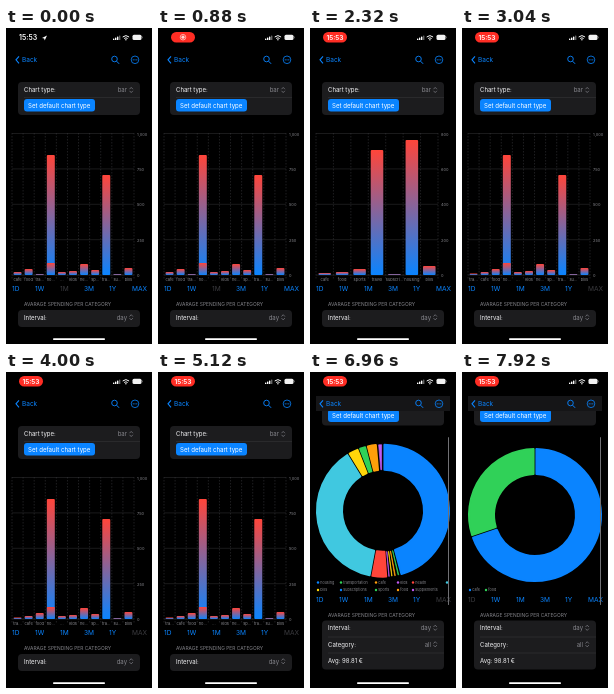
Animation, 146 px wide and 316 px high, one loop 8000 ms. Source, as an HTML page:

```html
<!DOCTYPE html>
<html>
<head>
<meta charset="utf-8">
<style>
html, body { margin: 0; width: 100%; height: 100%; overflow: hidden; background: #000; }
svg { display: block; width: 146px; height: 316px; font-family: Inter, Roboto, sans-serif; }
</style>
</head>
<body>
<svg id="stage" viewBox="0 0 146 316"></svg>
<script>
const stage = document.getElementById('stage');
const BLUE = '#0a84ff', GREEN = '#30d158', RED = '#ff453a', CYAN = '#40c8e0',
      YELLOW = '#ffd60a', ORANGE = '#ff9f0a', PURPLE = '#bf5af2',
      GRAY = '#85858b', CARD = '#1c1c1e';
const LOOP = 8000, STEP = 80;

const ease = (t, a, b) => {
  const x = Math.min(1, Math.max(0, (t - a) / (b - a)));
  return x * x * (3 - 2 * x);
};
const text = (x, y, s, size = 6, fill = '#f2f2f4', extra = '') =>
  `<text x="${x}" y="${y}" font-size="${size}" fill="${fill}" ${extra}>${s}</text>`;
const rect = (x, y, w, h, fill, r = 0, extra = '') =>
  `<rect x="${x}" y="${y}" width="${w}" height="${h}" rx="${r}" fill="${fill}" ${extra}/>`;
const line = (d, stroke, w = .5, extra = '') =>
  `<path d="${d}" fill="none" stroke="${stroke}" stroke-width="${w}" ${extra}/>`;
const dot = (x, y, r, fill) => `<circle cx="${x}" cy="${y}" r="${r}" fill="${fill}"/>`;
const END = 'text-anchor="end"', MID = 'text-anchor="middle"';

const picker = (y, s) => text(121, y, s, 6, GRAY, END) +
  line(`M123.5 ${y - 3} l1.7 -1.8 l1.7 1.8 M123.5 ${y - 1.4} l1.7 1.8 l1.7 -1.8`, GRAY, .7);

// Bar charts: axis maximum, bar heights in pixels, labels
const MONTH = { max: 1000, bars: [3, 6, 1, 120, 3, 4, 11, 5, 100, 1, 7],
  names: ['cafe', 'food', 'tra...', 'ho...', '...', 'kids', 'he...', 'sp...', 'tra...', 'su...', 'bills'] };
const WEEK = { max: 800, bars: [2, 3, 6, 125, 1, 135, 9],
  names: ['cafe', 'food', 'sports', 'travel', 'subscri...', 'housing', 'bills'] };
const MAX = { max: 1000, bars: [1.5, 3, 6, 120, 3, 4, 11, 5, 100, 1, 7],
  names: ['tra...', 'cafe', 'food', 'ho...', '...', 'kids', 'he...', 'sp...', 'tra...', 'su...', 'bills'] };

function barChart({ max, bars, names }) {
  const step = 122 / bars.length, w = step * .72;
  let s = '';
  for (let i = 0; i < 5; i++) {
    const y = 105.5 + i * 35.4;
    s += line(`M6 ${y}H128`, '#343437') +
      text(131, y + 2, (max * (4 - i) / 4).toLocaleString('en-US'), 4, GRAY);
  }
  bars.forEach((h, i) => {
    const x = 6 + step * i, mid = x + step / 2, y = 247 - h;
    s += line(`M${x} 105V252`, '#3d3d41', .5, 'stroke-dasharray="1.5 1.5"');
    s += rect(mid - w / 2, y, w, h, 'url(#heat)', Math.min(1, h / 2));
    if (h === 120) s += rect(mid - w / 2, 235, w, 12, 'url(#heat)', .8);
    s += text(mid, 253, names[i], 4, GRAY, MID);
  });
  return s + line('M128 105V252', '#3d3d41', .5, 'stroke-dasharray="1.5 1.5"');
}

// Donut slices: colour and end angle in degrees, clockwise from the top
const MANY = [[BLUE, 165], [GREEN, 168], [ORANGE, 171], [YELLOW, 173.5], [PURPLE, 176],
  [RED, 190.5], [CYAN, 328.5], [YELLOW, 338.5], [GREEN, 345.5], [ORANGE, 355], [PURPLE, 360]];
const TWO = [[BLUE, 251], [GREEN, 360]];

function donut(slices, cy) {
  let from = 0, s = '';
  for (const [color, to] of slices) {
    const span = (to - from) * Math.PI / 180, a = from * Math.PI / 180;
    const at = (r, end) => {
      const inset = Math.min(1.4 / r, span * .45);
      const q = end ? a + span - inset : a + inset;
      return `${(73 + r * Math.sin(q)).toFixed(2)} ${(cy - r * Math.cos(q)).toFixed(2)}`;
    };
    const big = to - from > 180 ? 1 : 0;
    const width = span < .1 ? .7 : 2;
    s += `<path d="M${at(66, 0)}A66 66 0 ${big} 1 ${at(66, 1)}L${at(41, 1)}A41 41 0 ${big} 0 ${at(41, 0)}Z"
      fill="${color}" stroke="${color}" stroke-width="${width}" stroke-linejoin="round"/>`;
    from = to;
  }
  return s;
}

const legend = items => items.map(([x, y, c, s]) =>
  dot(x, y, 1.2, c) + text(x + 2.3, y + 1.3, s, 3.7, GRAY)).join('');
const MANY_KEYS = [
  [8, 244, BLUE, 'housing'], [31, 244, GREEN, 'transportation'], [66, 244, ORANGE, 'cafe'],
  [88, 244, PURPLE, 'kids'], [103, 244, RED, 'health'], [137, 244, CYAN, ''],
  [8, 251.5, YELLOW, 'bills'], [31, 251.5, BLUE, 'subscriptions'], [66, 251.5, GREEN, 'sports'],
  [88, 251.5, ORANGE, 'food'], [103, 251.5, PURPLE, 'supplements']];
const TWO_KEYS = [[8, 251.5, BLUE, 'cafe'], [24, 251.5, GREEN, 'food']];

const ranges = active => ['1D', '1W', '1M', '3M', '1Y', 'MAX'].map((s, i) =>
  text([6, 29, 54, 78, 103, 126][i], 263, s, 6.6, s === active ? '#3c3c40' : BLUE)).join('');

function settings(pie) {
  let s = text(18, 278, 'AVARAGE SPENDING PER CATEGORY', 4.9, GRAY) +
    rect(12, 282, 122, pie ? 49 : 17, CARD, 4) + text(18, 291.5, 'Interval:') + picker(291.5, 'day');
  if (pie) s += line('M18 298.5H134M18 314.5H134', '#38383b') +
    text(18, 308, 'Category:') + picker(308, 'all') + text(18, 324.5, 'Avg: 98.81 €');
  return s;
}

const topCard = () => rect(12, 54, 122, 33, CARD, 4) + text(18, 64.2, 'Chart type:') +
  picker(64.2, 'bar') + line('M18 69.5H134', '#38383b') +
  rect(18, 71, 71, 12.5, BLUE, 3) + text(22, 79.6, 'Set default chart type', 6.1, '#fff');

function menu(open) {
  if (open <= 0) return '';
  return `<g opacity="${open}" transform="translate(122 69) scale(${.3 + .7 * open}) translate(-122 -69)">` +
    rect(34, 69, 94, 33.5, '#242427', 5) + rect(34, 69, 94, 33.5, 'url(#glow)', 5) +
    line('M34 86H128', '#3a3a3e') + line('M38.5 78l1.5 2l3 -4.2', '#fff', .9) +
    text(47, 80.2, 'bar') + text(47, 96.5, 'pie') + '</g>';
}

function status(t) {
  let s = '';
  if (t < 400) {
    s += text(13, 12.3, '15:53', 7, '#fff', 'font-weight="600"') +
      '<path d="M36 10l5 -2.4l-2.3 5l-.5 -2.2z" fill="#fff"/>';
  } else {
    s += rect(13, 4, 24, 10.5, '#ff2d24', 5.2);
    s += t < 1500
      ? `<circle cx="25" cy="9.2" r="2.8" fill="none" stroke="#ffd8d5" stroke-width=".7"/>` + dot(25, 9.2, 1.6, '#ffd8d5')
      : text(25, 11.7, '15:53', 6.6, '#fff', MID + ' font-weight="600"');
  }
  for (let i = 0; i < 4; i++)
    s += rect(107 + i * 2, 10.5 - i, 1.4, 1.6 + i, i < 3 ? '#fff' : '#666', .4);
  s += line('M116.7 9q3.2 -2.8 6.4 0M118.2 10.5q1.7 -1.4 3.4 0', '#fff', 1) + dot(119.9, 11.7, .7, '#fff');
  return s + rect(126.5, 6.8, 9, 5.2, '#f2f2f2', 1.5) + rect(136, 8.5, .7, 1.8, '#777', .3);
}

const nav = () => line('M13 28.3l-3 3.5l3 3.5', BLUE, 1.1) + text(16, 34.2, 'Back', 6.5, BLUE) +
  `<circle cx="108.5" cy="31" r="2.8" fill="none" stroke="${BLUE}" stroke-width=".9"/>` +
  line('M110.6 33.2l2.5 2.6', BLUE, 1) +
  `<circle cx="129" cy="31.8" r="3.8" fill="none" stroke="${BLUE}" stroke-width=".8"/>` +
  [-1.8, 0, 1.8].map(d => dot(129 + d, 31.8, .6, BLUE)).join('');

const DEFS = `<defs>
  <linearGradient id="heat" x2="0" y2="1"><stop stop-color="${RED}"/><stop offset="1" stop-color="${BLUE}"/></linearGradient>
  <radialGradient id="glow" cx=".3" cy=".25" r=".45"><stop stop-color="#1d4f83" stop-opacity=".6"/>
  <stop offset="1" stop-color="#242427" stop-opacity="0"/></radialGradient></defs>`;

function draw(t) {
  const pie = t >= 6400, two = t >= 7440;
  const scroll = 33.5 * ease(t, 6480, 6900);
  const open = ease(t, 5200, 5440) * (1 - ease(t, 6240, 6400));
  const chart = t < 1600 ? MONTH : t < 3040 ? WEEK : MAX;
  const active = two ? '1D' : t < 1600 ? '1M' : t < 3040 ? '' : 'MAX';
  const plot = !pie ? barChart(chart)
    : two ? donut(TWO, 176.5) + legend(TWO_KEYS)
    : donut(MANY, 172.2) + legend(MANY_KEYS);
  let s = DEFS + rect(0, 0, 146, 316, '#000') +
    `<g transform="translate(0 ${-scroll})">` + topCard() + plot + ranges(active) + settings(pie) + menu(open) + '</g>';
  s += rect(0, 0, 146, 24, '#000');
  if (scroll > 1) s += rect(6, 24, 134, 15, '#151517') +
    rect(138, 65, 1, 168, '#707074', .5);
  s += status(t) + nav() + rect(47, 310.3, 52, 1.7, '#fff', .8);
  stage.innerHTML = s;
}

let last = -1;
function tick() {
  const t = Math.floor(performance.now() % LOOP / STEP) * STEP;
  if (t !== last) draw(last = t);
  requestAnimationFrame(tick);
}
tick();
</script>
</body>
</html>
```
